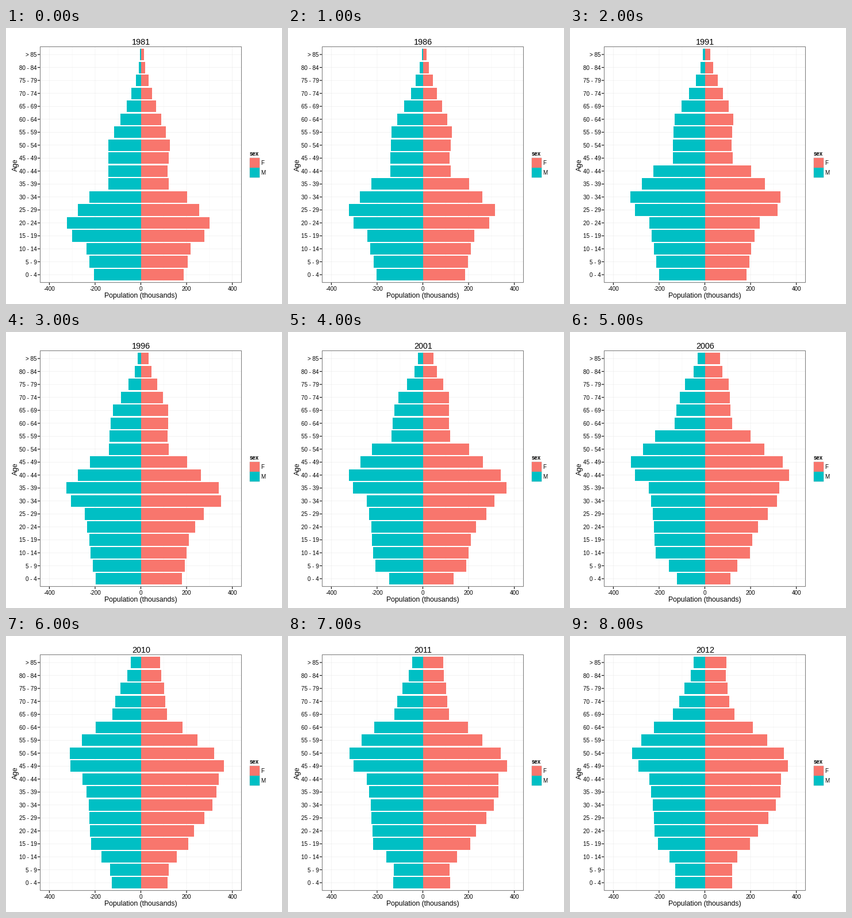
These frames come from a looping animation (480x480 px, 9 s). A matplotlib script:

```python
import numpy as np
import matplotlib.pyplot as plt
from matplotlib.animation import FuncAnimation
from matplotlib.patches import Rectangle

SIZE, DPI = 480, 100
PX = 72 / DPI
LEFT, RIGHT, TOP, BOTTOM = 59.5, 409.5, 32.57, 442.57
ZERO, STEP = 234.5, 79.55         # x of 0, pixels per 200 thousand
AXIS = 235                        # shared inner edge of the bars
ROW = (BOTTOM - TOP) / 18.2
HALF = 10.1                       # half a bar's height
COLORS = {"F": "#F8766D", "M": "#00BFC4"}
YEARS = [1981, 1986, 1991, 1996, 2001, 2006, 2010, 2011, 2012]

# Size of each birth cohort of men, as bar length in pixels
BIRTHS = [1901, 1916, 1931, 1946, 1951, 1961, 1966, 1971, 1981, 1996,
          2001, 2006, 2011]
COHORT = [14, 32, 58, 57, 90, 130, 122, 98, 91, 88, 66, 54, 58]
AGES = np.arange(18)              # five-year groups, youngest first


def sigmoid(x):
    return 1 / (1 + np.exp(-x))


def nearest(x):
    return np.floor(x + 0.5)


def bar_lengths(year, sex):
    """Follow every cohort as it ages: growth, immigration, mortality."""
    born = year - 5 * AGES
    size = np.interp(born, BIRTHS, COHORT) * (1 - 0.1 * np.exp(-AGES / 1.5))
    gain = 0.03 * (year - 1996)
    if sex == "M":
        size *= sigmoid((15.2 + gain - AGES) / 1.3)
    else:
        size *= 0.9 - 0.09 * np.exp(-((born - 1941) / 8) ** 2)
        arrived = sigmoid((AGES - 5 + 0.02 * (year - 1996)) / 0.7)
        size *= 1 + 0.6 * arrived * sigmoid((born - 1965) / 4)
        size *= sigmoid((16.8 + gain - AGES) / 1.5)
    size[-1] *= 1 + 0.015 * (year - 1981)     # open-ended group
    return nearest(size)


plt.rcParams["font.family"] = "Liberation Sans"
plt.rcParams["path.snap"] = False
fig = plt.figure(figsize=(SIZE / DPI, SIZE / DPI), dpi=DPI, facecolor="white")
ax = fig.add_axes([0, 0, 1, 1])
ax.set_xlim(0, SIZE)
ax.set_ylim(SIZE, 0)
ax.axis("off")


def text(x, y, s, size, ha="center", **kw):
    return ax.text(x, y, s, fontsize=size * PX, ha=ha, **kw)


def line(xs, ys, color, width, z):
    ax.plot(xs, ys, color=color, lw=width * PX, zorder=z,
            solid_capstyle="butt")


def block(x0, y0, x1, y1, color):
    return ax.add_patch(Rectangle((x0, y0), x1 - x0, y1 - y0, fc=color, lw=0,
                                  antialiased=False, zorder=3))


def frame(x0, y0, x1, y1, color, z):
    ax.add_patch(Rectangle((x0, y0), x1 - x0, y1 - y0, fc="none", ec=color,
                           lw=1.07 * PX, zorder=z))


# Grid, ticks and tick labels
for i in range(-2, 3):
    x = ZERO + i * STEP
    line([x, x], [TOP, BOTTOM], "#e5e5e5", 0.43, 1)
    line([x, x], [443, 447], "black", 1.07, 4)
    text(x, 457, str(200 * i), 9.9)
for i in range(-2, 2):
    x = ZERO + (i + 0.5) * STEP
    line([x, x], [TOP, BOTTOM], "#fafafa", 1.07, 0.5)

centers = BOTTOM - ROW * (0.6 + AGES)
labels = [f"{5 * a} - {5 * a + 4}" for a in AGES[:-1]] + ["> 85"]
for y, label in zip(centers, labels):
    line([LEFT, RIGHT], [y, y], "#e5e5e5", 0.43, 1)
    line([55, 59], [y, y], "black", 1.07, 4)
    text(53.5, nearest(y) + 4, label, 9.9, "right")

frame(LEFT, TOP, RIGHT, BOTTOM, "#7f7f7f", 5)

# Titles and legend
title = text(235, 29, "", 14.4)
text(234.5, 469, "Population (thousands)", 12.2)
text(20, 238, "Age", 12.2, rotation=90, va="center",
     rotation_mode="anchor").set_verticalalignment("baseline")
text(424, 222, "sex", 9.6, "left", fontweight="bold")
for y, sex in ((226, "F"), (243, "M")):
    frame(424, y, 441, y + 17, "#cccccc", 2)
    block(424, y, 441, y + 17, COLORS[sex])
    text(443.4, y + 12, sex, 9.9, "left")

tops, ends = nearest(centers - HALF), nearest(centers + HALF)
bars = {sex: [block(AXIS, a, AXIS, b, COLORS[sex])
              for a, b in zip(tops, ends)] for sex in "MF"}


def draw(i):
    title.set_text(str(YEARS[i]))
    for sex, side in (("M", -1), ("F", 1)):
        for bar, length in zip(bars[sex], bar_lengths(YEARS[i], sex)):
            bar.set_width(side * length)
    return [title, *bars["M"], *bars["F"]]


anim = FuncAnimation(fig, draw, frames=len(YEARS), interval=1000, repeat=True)
plt.show()
```
